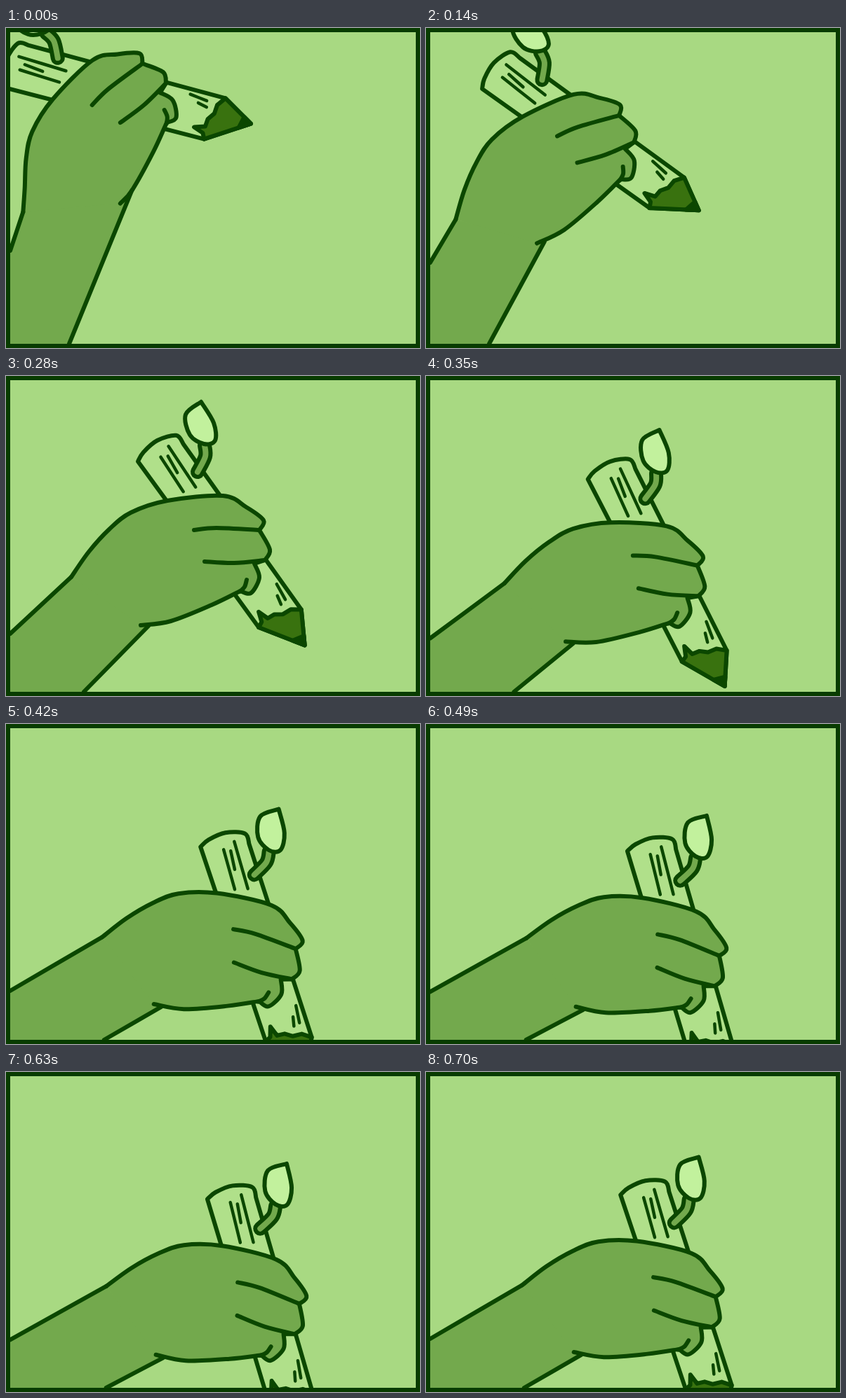
These frames come from a looping animation (590 by 457 pixels, 0.84 s). An HTML page with a canvas:

```html
<!DOCTYPE html>
<html lang="en">
<head>
<meta charset="utf-8">
<title>Hand with pencil</title>
<style>
  html, body { margin: 0; width: 100%; height: 100%; overflow: hidden; background: #a8d982; }
  canvas { display: block; }
</style>
</head>
<body>
<canvas id="stage" width="590" height="457"></canvas>
<script>
const ctx = document.getElementById('stage').getContext('2d');

const INK = '#0b4700', EDGE = '#083c00', PAPER = '#a8d982', SKIN = '#73a94d';
const WOOD = '#b0e08a', LEAD = '#39720f', LEAF = '#c2f19d';
const STEP = 70;

// A pose: fingertip x and y, turn of the hand in degrees, height of the arm at the left edge.
const mix = (a, b, t) => a.map((n, i) => n + (b[i] - n) * t);
const raised = [193, 36.5, -39.5, 318];
const swing = [279, 111, -18.5, 335];
const lower = [322, 153, -8.3, 352];
const level = [369, 208, 0, 368];
const hit = [424, 312, 17.5, 381];
const near = mix(level, hit, 0.5);
const sink = mix(level, hit, 1.1);
const steps = [raised, raised, swing, lower, level, near, hit, sink, hit, sink, hit, hit];

// Smooth runs through their points, with a corner where one run meets the next.
function curve(...runs) {
  const path = new Path2D();
  runs.forEach((run, r) => {
    path[r ? 'lineTo' : 'moveTo'](...run[0]);
    for (let i = 0; i < run.length - 1; i++) {
      const a = run[i], b = run[i + 1];
      const before = run[i - 1] || a, after = run[i + 2] || b;
      path.bezierCurveTo(
        a[0] + (b[0] - before[0]) / 6, a[1] + (b[1] - before[1]) / 6,
        b[0] - (after[0] - a[0]) / 6, b[1] - (after[1] - a[1]) / 6, ...b);
    }
  });
  return path;
}

function polygon(...points) {
  const path = new Path2D();
  points.forEach(p => path.lineTo(...p));
  path.closePath();
  return path;
}

function paint(path, fill, width = 6) {
  if (fill) {
    ctx.fillStyle = fill;
    ctx.fill(path);
  }
  if (width) {
    ctx.lineWidth = width;
    ctx.stroke(path);
  }
}

// Pencil: x runs along the barrel, y across it.
const heel = [293, 0], tip = [352, 38], shoulder = [308, 64];
const barrel = curve([heel], [tip], [shoulder],
  [[18, 67], [2, 66], [-8, 40], [-6, 14], [0, 0]], [heel]);
const lead = polygon(heel, [289, 8], [275, 13], [290, 18], [291, 29], [298, 39], [299, 52],
  shoulder, tip);
const nib = polygon(mix(heel, tip, 0.74), mix(shoulder, tip, 0.74), tip);
const grain = [[48, 8, 78], [39, 19, 46], [30, 14, 73], [57, 258, 283], [48, 272, 285]];

const stem = curve([[283, 99], [284, 115], [273, 137]]);
const leaf = curve([[278, 37], [256, 55], [262, 84], [282, 97], [298, 92], [296, 67], [278, 37]]);
const folds = [
  curve([[268, 220], [300, 217], [361, 220]]),
  curve([[283, 265], [325, 267], [369, 263]]),
  curve([[343, 291], [340, 301], [333, 308]])
];

const handOutline = (knob, crease) => curve(
  [knob, [118, 251], [147, 219], [178, 195], [230, 178], [309, 171], [342, 187], [367, 206], [361, 220]],
  [[361, 220], [376, 248], [369, 263]],
  [[354, 268], [361, 288], [349, 310], [334, 307]],
  [[334, 307], [293, 327], [235, 350], crease]);

function drawPencil() {
  ctx.save();
  ctx.translate(188, 122);
  ctx.rotate(54 * Math.PI / 180);
  ctx.scale(1, -1);
  paint(barrel, WOOD);
  paint(lead, LEAD);
  paint(nib, INK);
  for (const [y, from, to] of grain) paint(curve([[from, y], [to, y - 3]]), null, 4.5);
  ctx.restore();
}

function drawSprout() {
  paint(stem, null, 20);
  ctx.strokeStyle = SKIN;
  paint(stem, null, 8);
  ctx.strokeStyle = INK;
  paint(leaf, LEAF);
}

function draw([x, y, turn, left]) {
  const place = new DOMMatrix().translate(x, y).rotate(turn).translate(-level[0], -level[1]);
  const onStage = ([px, py]) => {
    const p = place.transformPoint(new DOMPoint(px, py));
    return [p.x, p.y];
  };

  // The wrist folds up when the hand is bent far back.
  const fold = Math.min(1, Math.max(0, (-turn - 20) / 20));
  const knob = mix([93, 287], [95, 275], fold);
  const crease = mix([192, 356], [210, 354], fold);
  const elbow = mix([203, 357], [235, 350], fold);
  const armTop = [[6, left], onStage(knob)];
  const armBase = [onStage(elbow), [Math.max(90, 111 + 1.65 * turn), 451]];

  ctx.resetTransform();
  ctx.fillStyle = PAPER;
  ctx.fillRect(0, 0, 590, 457);
  ctx.lineCap = ctx.lineJoin = 'round';
  ctx.strokeStyle = INK;

  ctx.setTransform(place);
  drawPencil();
  drawSprout();
  ctx.resetTransform();
  paint(polygon(...armTop, ...armBase, [6, 451]), SKIN, 0);
  ctx.setTransform(place);
  paint(handOutline(knob, crease), SKIN);
  folds.forEach(path => paint(path));
  ctx.resetTransform();
  paint(curve(armTop));
  paint(curve(armBase));

  ctx.strokeStyle = EDGE;
  ctx.lineJoin = 'miter';
  ctx.strokeRect(3, 3, 584, 451);
}

const start = performance.now();
function tick() {
  const step = Math.floor((performance.now() - start) / STEP);
  draw(steps[step % steps.length]);
  requestAnimationFrame(tick);
}
tick();
</script>
</body>
</html>
```
